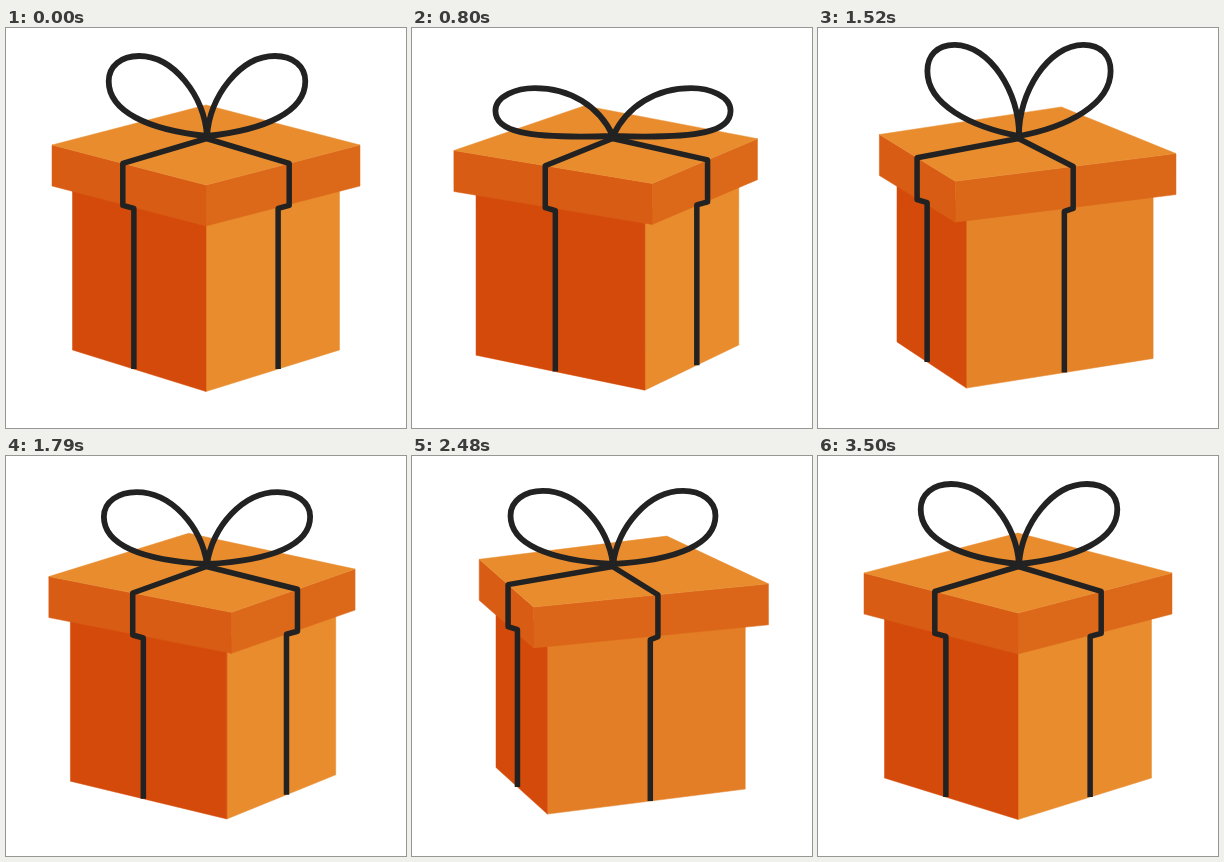
Recreate the animation shown at these times as an HTML page with a canvas. Size 400 px wide and 400 px high, loop 3.53 s.

```html
<!DOCTYPE html>
<html>
<head>
<meta charset="utf-8">
<style>
html, body { margin: 0; height: 100%; overflow: hidden; background: #fff; }
canvas { display: block; }
</style>
</head>
<body>
<canvas id="stage" width="400" height="400"></canvas>
<script>
const ctx = document.getElementById('stage').getContext('2d');
const LOOP = 3530, INK = '#222', LID = 41;
const LIGHT = [232, 140, 46], DARK = [212, 74, 10];
const LID_LEFT = [216, 92, 20], LID_RIGHT = [220, 105, 26];

// [time, value] keys
const TURN = [[530, 0], [800, 11.2], [1040, 30.2], [1220, 44.6], [1790, 97],
  [2120, 128], [2480, 157], [2990, 175.8], [3500, 180]];
const BOW_TOP = [[530, 28], [800, 60], [880, 63], [1220, 23.5], [1370, 13], [1580, 20],
  [1790, 36], [1880, 38], [2170, 17], [2420, 37], [2480, 35], [2850, 13], [2990, 18],
  [3200, 25], [3500, 28]];

const clamp = v => Math.min(1, Math.max(0, v));
const lerp = (a, b, k) => a + (b - a) * k;
const rgb = c => `rgb(${c.map(Math.round)})`;
const mix = (a, b, k) => a.map((v, i) => lerp(v, b[i], k));

function sample(keys, t) {
  const last = keys.length - 1;
  if (t <= keys[0][0]) return keys[0][1];
  if (t >= keys[last][0]) return keys[last][1];
  const i = keys.findIndex(k => k[0] > t) - 1;
  const slope = j => j === 0 || j === last ? 0 :
    (keys[j + 1][1] - keys[j - 1][1]) / (keys[j + 1][0] - keys[j - 1][0]);
  const [t0, a] = keys[i], [t1, b] = keys[i + 1];
  const h = t1 - t0, u = (t - t0) / h, v = 1 - u;
  return a * v * v * (1 + 2 * u) + b * u * u * (3 - 2 * u) +
    h * u * v * (slope(i) * v - slope(i + 1) * u);
}

// Orbit of a point around the box axis; 0 degrees faces the viewer
function orbit(deg, xs, ys) {
  const a = deg * Math.PI / 180;
  return [
    xs.reduce((s, c, i) => s + c * Math.sin((i + 1) * a), 200),
    ys.reduce((s, c, i) => s + c * Math.cos(i * a), 0)
  ];
}
const lidCorner = deg => orbit(deg, [159, 16.5, 5], [115.6, 37.5, 0, 2.5, 1.4]);
const baseCorner = deg => orbit(deg, [136.5, 12, 3], [323, 36, 1, 3.5]);

const down = ([x, y], d) => [x, y + d];
const onEdge = (a, b, x) => [x, lerp(a[1], b[1], clamp((x - a[0]) / (b[0] - a[0])))];

function polygon(color, ...points) {
  ctx.beginPath();
  points.forEach(p => ctx.lineTo(...p));
  ctx.closePath();
  ctx.fillStyle = ctx.strokeStyle = rgb(color);
  ctx.lineWidth = 0.5;
  ctx.fill();
  ctx.stroke();
}

function line(width, ...points) {
  if (width <= 0) return;
  ctx.beginPath();
  points.forEach(p => ctx.lineTo(...p));
  ctx.strokeStyle = INK;
  ctx.lineWidth = width;
  ctx.stroke();
}

// A wall is visible only while its corners run from left to right
const wall = (color, a, b, height) =>
  b[0] > a[0] && polygon(color, a, b, down(b, height), down(a, height));

function ribbon(deg, lidA, lidB, baseA, baseB) {
  const knot = [200.5, 110.5], side = Math.abs(deg);
  if (lidB[0] <= lidA[0]) {
    line(0.8, [170, 114], [256, 114]);
    return;
  }
  const width = (4 + 1.5 * clamp(side / 20)) * clamp((82 - side) / 10);
  const top = onEdge(lidA, lidB, orbit(deg, [110, 4, 2], [0])[0]);
  const bottom = onEdge(baseA, baseB, orbit(deg, [102], [0])[0]);
  const rim = down(top, LID + 1);
  line(width, knot, top, rim, [bottom[0], rim[1] + 3], bottom);
}

function loop(top) {
  const d = top - 28, xt = 142 - 0.32 * top, xl = 119.5 - 0.6 * top, yl = 27.5 + 0.92 * top;
  ctx.beginPath();
  ctx.moveTo(201, 108);
  ctx.bezierCurveTo(198 - 0.34 * d, 68 + 0.31 * d, xt + 35, top, xt, top);
  ctx.bezierCurveTo(xt - 18, top, xl, yl - 15, xl, yl);
  ctx.bezierCurveTo(xl, yl + 30 - 0.3 * d, 142 - 0.94 * d, 102 + 0.28 * d, 201, 108);
  ctx.strokeStyle = INK;
  ctx.lineWidth = 5.8;
  ctx.stroke();
}

function draw(t) {
  // A quarter turn looks the same, so keep the angle within -45..45
  const turn = sample(TURN, t);
  const phi = turn - 90 * Math.round(turn / 90);
  const [left, front, right, back] = [-90, 0, 90, 180].map(a => lidCorner(a + phi));
  const [baseL, baseF, baseR] = [-90, 0, 90].map(a => baseCorner(a + phi));
  const lit = 1 - Math.max(0, -phi / 45) ** 2.2;

  ctx.clearRect(0, 0, 400, 400);
  ctx.lineJoin = 'round';
  wall(mix(DARK, LIGHT, lit), baseF, baseR, -180);
  wall(DARK, baseL, baseF, -180);
  wall(mix(LID_LEFT, LID_RIGHT, lit), front, right, LID);
  wall(LID_LEFT, left, front, LID);
  polygon(LIGHT, left, front, right, back);

  ribbon(phi - 45, left, front, baseL, baseF);
  ribbon(phi + 45, front, right, baseF, baseR);

  const top = sample(BOW_TOP, t);
  loop(top);
  ctx.save();
  ctx.translate(402, 0);
  ctx.scale(-1, 1);
  loop(top);
  ctx.restore();
  ctx.beginPath();
  ctx.arc(201, 109, 3.8, 0, 7);
  ctx.fillStyle = INK;
  ctx.fill();
}

function tick() {
  draw(performance.now() % LOOP);
  requestAnimationFrame(tick);
}
tick();
</script>
</body>
</html>
```
